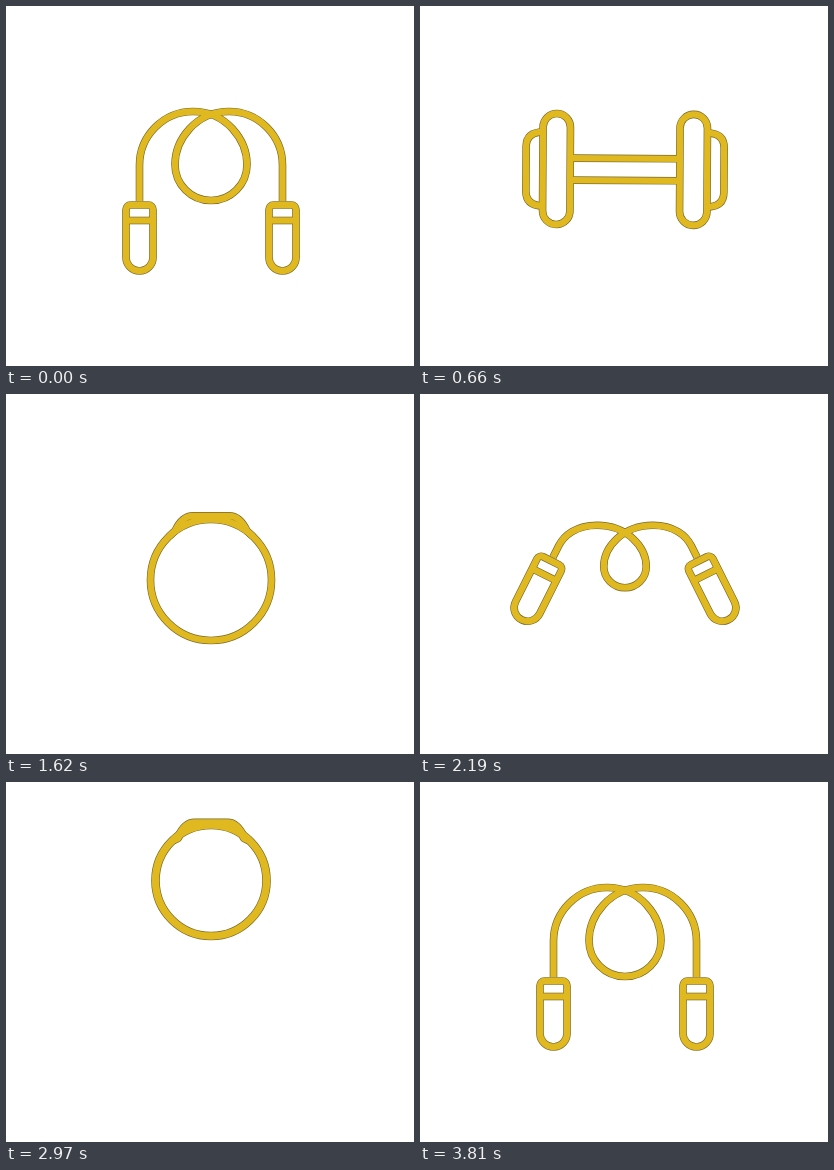
These frames come from a looping animation (408 by 360 pixels, 3.84 s). An HTML page:

```html
<!DOCTYPE html>
<html lang="en">
<head>
<meta charset="utf-8">
<title>Workout gear loop</title>
<style>
  html, body { margin: 0; width: 100%; height: 100%; overflow: hidden; background: #fff; }
  svg { display: block; width: 100vw; height: 100vh; }
  g { fill: none; stroke-linejoin: round; }
</style>
</head>
<body>
<svg viewBox="0 0 408 360">
  <g transform="translate(205 0)">
    <g id="edge" stroke="#77672e"></g>
    <g id="body" stroke="#dfb91f"></g>
  </g>
</svg>
<script>
const LOOP = 1920, STEP = 30;
const MID = 163.5;            // height of the dumbbell axis
const SKY = 98.5;             // height of the ring at its highest
const RING = 55.5;            // ring radius up there
const LINE = 7.3;
const edge = document.getElementById('edge');
const body = document.getElementById('body');

const mix = (a, b, p) => a + (b - a) * p;
const part = (t, from, to) => Math.min(1, Math.max(0, (t - from) / (to - from)));
const smooth = (t, from, to) => {
  const p = part(t, from, to);
  return p * p * (3 - 2 * p);
};
const cubic = (t, from, to) => {
  const p = part(t, from, to);
  return p < 0.5 ? 4 * p ** 3 : 1 - 4 * (1 - p) ** 3;
};

const path = d => `<path d="${d}"/>`;
const group = (transform, inner) => `<g transform="${transform}">${inner}</g>`;
const mirror = inner => inner + group('scale(-1 1)', inner);

// Rounded box across the axis, from v0 to v1 along it.
function box(v0, v1, h, r0, r1) {
  const arc = (r, x, y) => `A${r} ${r} 0 0 1 ${x} ${y}`;
  return path(`M${r0 - h} ${v0}H${h - r0}${arc(r0, h, v0 + r0)}V${v1 - r1}` +
    `${arc(r1, h - r1, v1)}H${r1 - h}${arc(r1, -h, v1 - r1)}V${v0 + r0}${arc(r0, r0 - h, v0)}Z`);
}

// Neck (nx, ny) with handle angle, top of the arm (ax, ay), loop radius and lowest point.
function rope({ nx, ny, angle, ax, ay, r, low, size = 1 }) {
  const rad = angle * Math.PI / 180, stem = 0.4 * Math.abs(ny - ay);
  const sin = Math.sin(rad), cos = Math.cos(rad);
  const kx = -nx + stem * sin, ky = ny - stem * cos;
  const pull = 0.55 * Math.abs(ky - ay), ly = low - r, c = 0.5523 * r;
  const cord = path(`M${-nx} ${ny}L${kx} ${ky}` +
    `C${kx + pull * sin} ${ky - pull * cos} ${mix(-ax, kx, 0.55)} ${ay} ${-ax} ${ay}` +
    `C${mix(-ax, r, 0.62)} ${ay} ${r} ${mix(ly, ay, 0.46)} ${r} ${ly}` +
    `C${r} ${ly + c} ${c} ${low} 0 ${low}`);
  const grip = box(4, 70, 13.5, 4.5, 13.5) + path('M-13.5 19.5H13.5');
  return mirror(cord + group(`translate(${-nx} ${ny}) rotate(${angle}) scale(${size})`, grip));
}

const REST = { nx: 71.5, ny: 195, ax: 18, ay: 105.5, r: 36, low: 194.5 };

// The handles swing out until the rope is straight.
function lift(t) {
  const u = part(t, 30, 390), snap = u ** 9;
  return rope({
    nx: REST.nx + 20.5 * snap,
    ny: mix(REST.ny, MID - 0.5, smooth(u, 0, 0.7)),
    angle: 90 * u ** 3,
    ax: REST.ax + 15 * u,
    ay: mix(REST.ay, MID, u * u),
    r: REST.r * (1 - u ** 2.2),
    low: mix(REST.low, MID, snap)
  });
}

// The ring opens and throws the handles down and out before they settle.
function unroll(t) {
  const q = smooth(t, 1620, 1890), swing = Math.sin(Math.PI * q);
  return rope({
    nx: mix(34, REST.nx, q) + 45 * swing,
    ny: mix(125, REST.ny, q) + 110 * swing,
    angle: 28 * swing,
    ax: REST.ax * q,
    ay: mix(125, REST.ay, q),
    r: mix(60.5, REST.r, q),
    low: mix(246.5, REST.low, q),
    size: Math.min(1, 0.1 + 2 * q)
  });
}

// Handles become plates, then both plates spin, rise and fuse into one ring.
function dumbbell(t) {
  const form = smooth(t, 420, 570), fuse = smooth(t, 690, 1020);
  const morph = (grip, plate, ring) => mix(mix(grip, plate, form), ring, fuse);
  const nx = morph(92, 54.8, 0), gap = morph(0, 11, 0);
  const plate = box(morph(4, 0, -RING), morph(70, 27.4, RING), morph(13.5, RING, RING),
    morph(4.5, 13.7, RING), morph(13.5, 13.7, RING));
  const w = morph(13.5, 37, 20), v0 = morph(19.5, 27, 52), v1 = morph(19.5, 44.2, RING);
  const cap = path(`M${-w} ${v0}Q${-w} ${v1} ${-w * 0.6} ${v1}H${w * 0.6}Q${w} ${v1} ${w} ${v0}`);
  const side = group(`translate(${-nx} 0) rotate(90)`, plate + cap);
  const bars = path(`M${-nx} ${-gap}H${nx}M${-nx} ${gap}H${nx}`);
  const y = mix(MID, SKY, cubic(t, 640, 980));
  return group(`translate(0 ${y}) rotate(${90 * cubic(t, 630, 930)})`, mirror(side) + bars);
}

// The grip grows while the weight drops, bounces and takes the grip back in.
function kettlebell(t) {
  const fall = smooth(t, 1110, 1410);
  const y = SKY + 99.5 * fall - 12 * smooth(t, 1410, 1530);
  const r = RING + 5 * fall, k = r / 60.5;
  const h = 44 * (smooth(t, 1030, 1180) - smooth(t, 1410, 1665));
  const top = -r - h;
  const grip = path(`M${-42 * k} ${-43.5 * k}L${-36 * k} ${top + 15}` +
    `Q${-29 * k} ${top} ${-18 * k} ${top}H${18 * k}` +
    `Q${29 * k} ${top} ${36 * k} ${top + 15}L${42 * k} ${-43.5 * k}`);
  return group(`translate(0 ${y})`, `<circle r="${r}"/>` + (h > 0.5 ? grip : ''));
}

function render(ms) {
  const t = Math.floor(ms / STEP) * STEP % LOOP;
  const draw = t < 420 ? lift : t < 1020 ? dumbbell : t < 1650 ? kettlebell : unroll;
  const width = LINE + smooth(t, 900, 1050) - smooth(t, 1110, 1410);
  edge.setAttribute('stroke-width', width + 0.3);
  body.setAttribute('stroke-width', width - 1);
  edge.innerHTML = body.innerHTML = draw(t);
}

const start = performance.now();
function tick() {
  render(performance.now() - start);
  requestAnimationFrame(tick);
}
tick();
</script>
</body>
</html>
```
